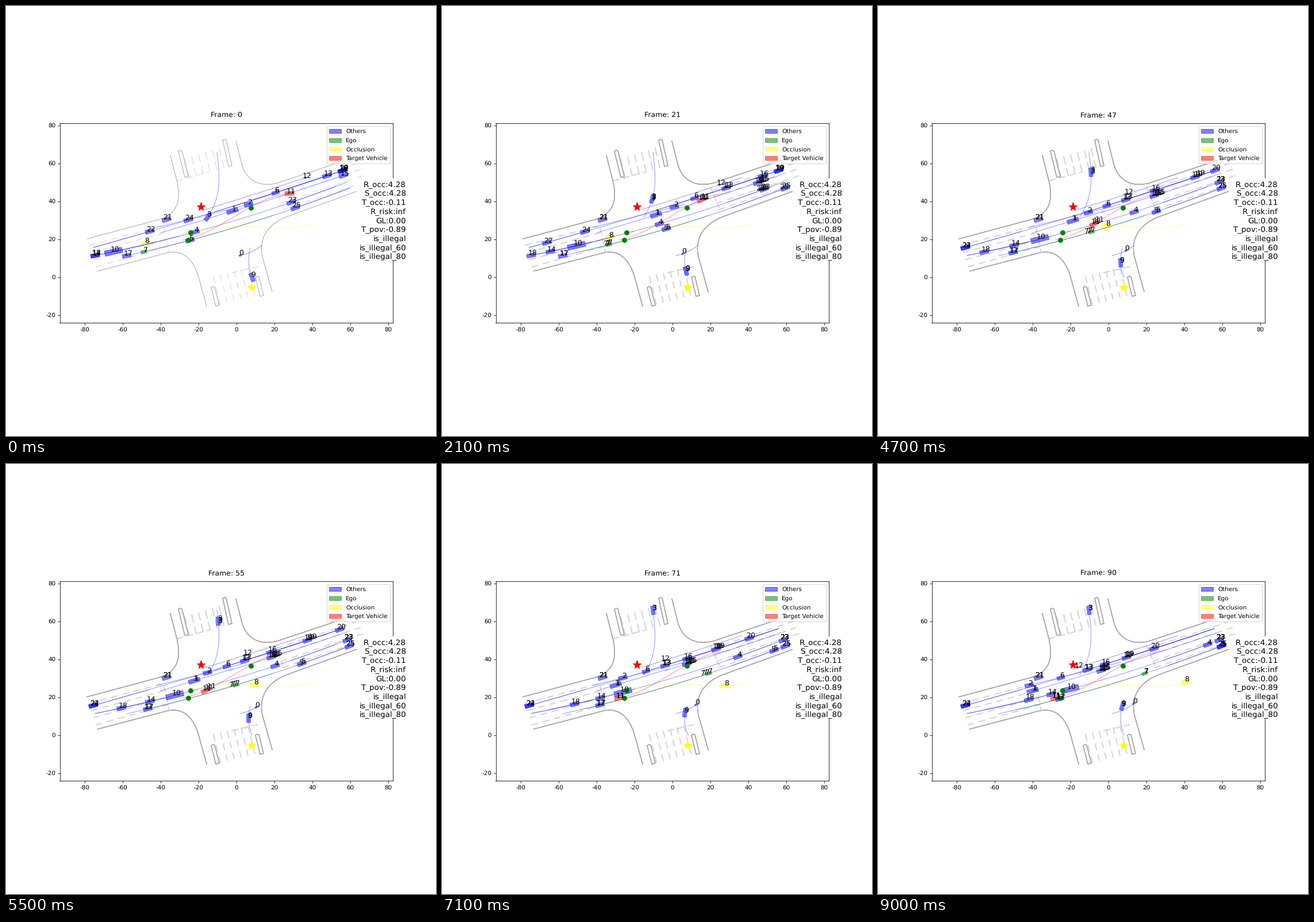
These frames come from a looping animation (748x748 px, 9.1 s). A matplotlib script:

```python
import matplotlib.pyplot as plt
import numpy as np
from matplotlib.animation import FuncAnimation
from matplotlib.patches import Patch, Polygon, Rectangle
from matplotlib.transforms import Affine2D
from numpy.polynomial import Polynomial

SIZE, FRAMES, STEP = 748, 91, 100
COPIES = 8  # the map is painted again every frame, which darkens its edges

plt.rcParams.update({"axes.unicode_minus": False, "font.family": "DejaVu Sans",
                     "text.hinting": "none"})

fig, ax = plt.subplots(figsize=(10, 10), dpi=SIZE / 10)
ax.set(xlim=(-93.18, 82.48), ylim=(-24.15, 81), aspect="equal",
       xticks=range(-80, 81, 20), yticks=range(-20, 81, 20))
ax.set_autoscale_on(False)
title = ax.set_title("Frame: 0", pad=10.3)

# Stage pixels, y pointing down
PX = Affine2D().scale(1 / SIZE, -1 / SIZE).translate(0, 1) + fig.transFigure


# ---- road map -------------------------------------------------------------
GAP = np.array([[np.nan, np.nan]])


def corner(start, a, b, c, d, end):
    """Straight, cubic bend, straight."""
    a, b, c, d = map(np.array, (a, b, c, d))
    u = np.linspace(0, 1, 40)[:, None]
    v = 1 - u
    bend = v ** 3 * a + 3 * u * v ** 2 * b + 3 * u ** 2 * v * c + u ** 3 * d
    return np.vstack([[start], bend, [end], GAP])


def island(x, y, dx, dy):
    """Narrow traffic island with its left top corner at x, y."""
    return np.vstack([[(x, y), (x + 3, y - 2), (x + 6, y - 1), (x + 6 + dx, y + dy - 1.5),
                       (x + dx, y + dy), (x, y)], GAP])


def dashes(p, q, on=10, off=10):
    p, q = np.array(p, float), np.array(q, float)
    length = np.hypot(*(q - p))
    unit = (q - p) / length
    return np.vstack([[p + unit * s, p + unit * min(s + on, length), GAP[0]]
                      for s in np.arange(0, length, on + off)])


solid = np.vstack([
    corner((286, 260), (297, 303), (306, 340), (297, 362), (266, 371.5), (141, 405)),
    corner((160, 461), (278, 430), (315, 420), (330, 452), (336, 475), (349, 522)),
    corner((400, 235), (410, 275), (418, 303), (440, 316), (472, 308), (610, 262)),
    corner((463, 497), (447, 440), (437, 404), (457, 378), (490, 366), (625, 317)),
    island(300, 253, 11, 45), island(377, 234, 10, 45),
    island(357, 490, 8, 32), island(434, 472, 8, 33),
])

broken = [dashes((298, 304), (353, 289), 10, 8), dashes((393, 464), (444, 452), 10, 8),
          dashes((275, 386), (284, 429), 10, 9), dashes((467, 316), (482, 350), 9, 7)]
for i in range(4):
    broken.append(dashes((145 + 4 * i, 416 + 12.6 * i), (274 + 3 * i, 382 + 12.1 * i)))
    broken.append(dashes((470 + 4 * i, 321 + 11 * i), (621, 270.5 + 12.3 * i)))
for i in range(6):
    x, y = 311 + 12 * i, 266 - 3.6 * i
    broken.append(dashes((x, y), (x + 8, y + 33), 13, 8))
    x, y = 361 + 12 * i, 471 - 3 * i
    broken.append(dashes((x, y), (x + 12, y + 48), 10, 9.5))

roads = [[ax.plot(*pts.T, color=c, lw=1, transform=PX, zorder=1.5)[0]
          for pts, c in ((solid, "darkgray"), (np.vstack(broken), "lightgray"))]
         for _ in range(COPIES)]


# ---- vehicles -------------------------------------------------------------
def curve(*pts):
    """Polynomial through all points, as side(main)."""
    main, side = np.transpose(pts)
    return Polynomial.fit(main, side, len(pts) - 1)


WEST = curve((152, 420), (394, 348.5), (586, 286))
EAST = curve((155, 434), (329, 393), (573, 314))
LANE = 9      # westbound lane width
OUTER = 12    # eastbound lane width


class Car:
    """Runs along `path` from `a` to `b` during `t`.

    `ease` below zero speeds up and above zero slows down, `glide` does both;
    `tall` swaps the axes of the path.
    """

    def __init__(self, path, a, b, ease=0, t=(0, 90), glide=0, tall=False,
                 size=(15, 6.6), color="blue"):
        self.path, self.slope, self.tall, self.size = path, path.deriv(), tall, size
        self.a, self.b, self.t, self.ease, self.glide = a, b, t, ease, glide
        self.box = Polygon(np.zeros((4, 2)), color=color, alpha=0.5, lw=1,
                           transform=PX, zorder=1.6)
        ax.add_patch(self.box)
        ax.plot(*self.point(np.linspace(a, b, 80)), color=color, alpha=0.5, lw=0.8,
                transform=PX, zorder=2)

    def point(self, s):
        side = self.path(s)
        return np.array([side, s] if self.tall else [s, side])

    def at(self, n):
        u = np.clip((n - self.t[0]) / (self.t[1] - self.t[0]), 0, 1)
        u += self.ease * u * (1 - u) + self.glide * u * (1 - u) * (2 * u - 1)
        return self.a + (self.b - self.a) * u

    def place(self, n):
        s = self.at(n)
        k = self.slope(s)
        d = np.array([k, 1] if self.tall else [1, k]) / np.hypot(1, k)
        along, across = d * self.size[0] / 2, d[::-1] * (-1, 1) * self.size[1] / 2
        c = self.point(s)
        self.box.set_xy([c + along + across, c + along - across,
                         c - along - across, c - along + across])


DOT = (3, 2.5)
cars = [
    Car(curve((407, 434), (425, 428.5), (444.5, 417)), 407, 444.5, 0.2, (0, 79), size=DOT),
    Car(WEST + LANE - 1, 394, 269, -0.33, size=(20, 7)),
    Car(curve((422, 345), (263, 385)), 422, 263, -0.68),
    Car(curve((367, 351), (338, 365), (300, 370.5), (254.5, 367)), 367, 254.5, -0.22,
        (0, 64), tall=True),
    Car(EAST, 329, 573.5, -0.18),
    Car(EAST + OUTER, 320, 598, -0.12, (0, 76)),
    Car(WEST, 469, 318, -0.2, size=(13, 6)),
    Car(EAST + OUTER, 240, 464, -0.34, (0, 71), size=(10, 5), color="green"),
    Car(curve((243, 413), (336, 391), (399, 383), (483, 386), (535, 379)), 243, 535,
        glide=0.7, size=(15.5, 7), color="yellow"),
    Car(curve((472, 428), (440, 422), (421, 425)), 472, 421, -0.1, tall=True),
    Car(EAST, 187, 334, 0.48, size=(31, 9)),
    Car(curve((493, 326), (416, 355), (345, 395), (308, 407)), 493, 308, -0.45, (0, 65),
        size=(15.5, 7), color="red"),
    Car(WEST - LANE, 521, 347, -0.08, size=DOT),
    Car(WEST, 558, 364, 0.53),
    Car(EAST, 155, 301, 0.26, (5, 90)),
    Car(WEST + LANE, 587, 388, 0.24, (8, 90)),
    Car(WEST, 585, 394, 0.42, (13, 90)),
    Car(EAST + OUTER, 210, 316, -0.5, (24, 90)),
    Car(EAST, 155, 262, 0.17, (33, 90)),
    Car(WEST, 585, 432, 0.32, (38, 90)),
    Car(WEST, 586, 480, 0, (53, 90)),
    Car(WEST - OUTER, 279, 279),
    Car(WEST, 250, 151.5, 0.23, (0, 33)),
    Car(EAST, 496, 593.5, 0.1, (0, 33)),
    Car(WEST, 317, 152, -0.12, (0, 47)),
    Car(EAST + OUTER, 503, 597, 0, (0, 21)),
]

# Some labels outlive their frame and trail behind the vehicle
labels = [(ax.text(0, 0, str(k), size=12, ha="center", transform=PX), car, age)
          for k, car in enumerate(cars) for age in range(5) if (k + 1) % 2 ** age == 0]

# ---- markers, legend, readout --------------------------------------------
for x, y in ((321, 394), (317.5, 407), (426, 351)):
    ax.plot(x, y, "o", color="green", ms=7.5, transform=PX, zorder=2.2)
for x, y, color in ((339, 349.5, "red"), (427, 489.5, "yellow")):
    ax.plot(x, y, "*", color=color, ms=14.5, transform=PX, zorder=2.2)

kinds = {"Others": "blue", "Ego": "green", "Occlusion": "yellow", "Target Vehicle": "red"}
ax.legend(handles=[Patch(color=c, alpha=0.5, label=s) for s, c in kinds.items()],
          loc="upper right", labelspacing=0.57)

ax.add_patch(Rectangle((610, 300.5), 89, 143, fc="white", ec="none", transform=PX,
                       zorder=3.5, clip_on=False))
readout = ("R_occ:4.28", "S_occ:4.28", "T_occ:-0.11", "R_risk:inf", "GL:0.00",
           "T_pov:-0.89", "is_illegal", "is_illegal_60", "is_illegal_80")
for i, line in enumerate(readout):
    ax.text(696, 314.5 + 15.72 * i, line, size=13, ha="right", transform=PX, zorder=4)


def update(n):
    title.set_text(f"Frame: {n}")
    for i, pair in enumerate(roads):
        for line in pair:
            line.set_visible(i <= n)
    for car in cars:
        car.place(n)
    for text, car, age in labels:
        x, y = car.point(car.at(n - age))
        text.set_position((x + 2.5, y))
        text.set_visible(n >= age)
    return []


anim = FuncAnimation(fig, update, frames=FRAMES, interval=STEP, repeat=True, repeat_delay=0)
plt.show()
```
